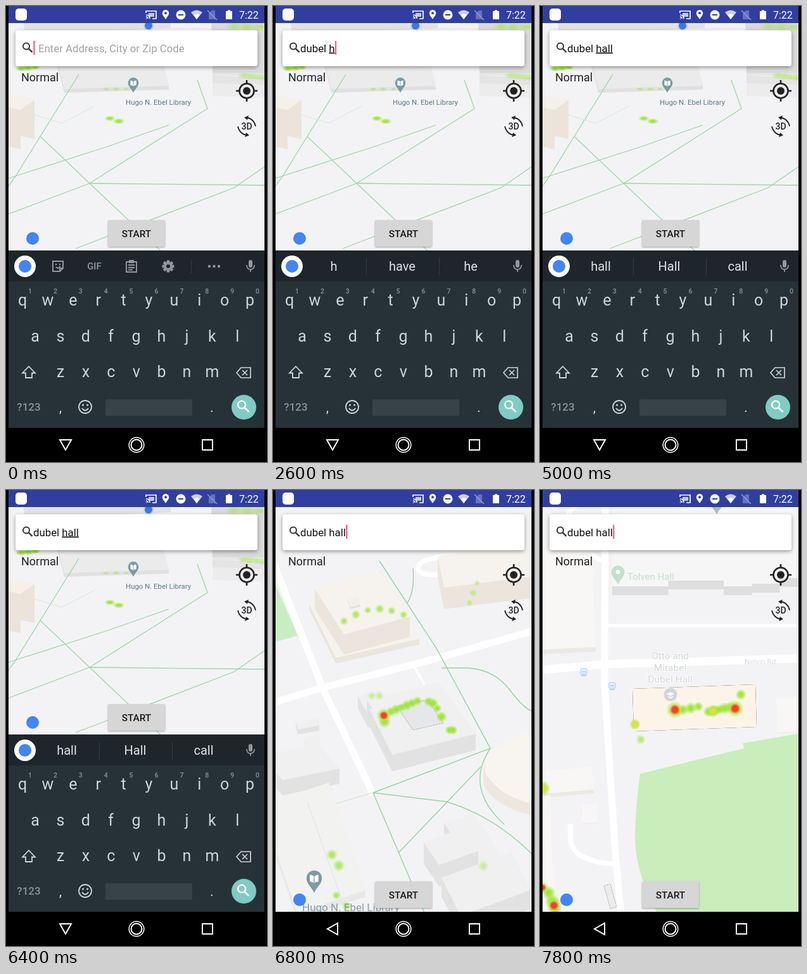
Animation of 412 by 720 pixels, one loop 8 s. Source, as an HTML page:

```html
<!DOCTYPE html>
<html lang="en">
<head>
<meta charset="utf-8">
<title>Map search</title>
<style>
html, body { margin: 0; height: 100%; overflow: hidden; background: #000; }
svg { display: block; width: 100%; height: 100%; font-family: Roboto, sans-serif; }
text { white-space: pre; }
.mid { text-anchor: middle; }
.bold { font-weight: 500; }
.u { text-decoration: underline; }
</style>
</head>
<body>
<svg id="stage" viewBox="0 0 412 720"></svg>
<script>
const LOOP = 8000, STEP = 200;
const KEY = 350, PRESS = 100;              // one key every 350 ms, its bubble just before
const IDLE = 5000, HIDE = 6600, FLY = 6800, ARRIVE = 7000;
const QUERY = 'dubel hall', LIBRARY = 'Hugo N. Ebel Library';
const suggestions = ['d do did', 'du due dude', 'dub dubbed double', 'dube dub due', 'dubel duel fuel',
  'hall is and', 'h have he', 'ha have had', 'hal half hall', 'hall Hall call'];

// drawing helpers
const shape = (d, fill, more = '') => `<path d="${d}" fill="${fill}" ${more}/>`;
const line = (d, color, w) => shape(d, 'none', `stroke="${color}" stroke-width="${w}"`);
const disc = (x, y, r, fill, more = '') => `<circle cx="${x}" cy="${y}" r="${r}" fill="${fill}" ${more}/>`;
const ring = (x, y, r, color, w) => disc(x, y, r, 'none', `stroke="${color}" stroke-width="${w}"`);
const box = (x, y, w, h, fill, more = '') =>
  `<rect x="${x}" y="${y}" width="${w}" height="${h}" fill="${fill}" ${more}/>`;
const text = (x, y, size, fill, str, cls = '', more = '') =>
  `<text x="${x}" y="${y}" font-size="${size}" fill="${fill}" class="${cls}" ${more}>${str}</text>`;
const mid = (x, y, size, fill, str, more) => text(x, y, size, fill, str, 'mid', more);
const bold = (x, y, size, fill, str) => text(x, y, size, fill, str, 'mid bold');
const group = (id, inner) => `<g id="${id}">${inner}</g>`;
const at = (x, y, inner, s = 1) => `<g transform="translate(${x} ${y}) scale(${s})">${inner}</g>`;
const times = (n, fn) => Array.from({ length: n }, (_, i) => fn(i)).join('');

const STONE = ['#f0f0f0', '#e2e2e2'], SAND = ['#f6f3ef', '#ebe5de'], PALE = ['#f8f7f6', '#ece8e3'];

// a building: roof from a corner and two edges, walls dropped by h
function block(x, y, ux, uy, vx, vy, h, [roof, wall]) {
  const quad = `l${ux} ${uy}l${vx} ${vy}l${-ux} ${-uy}z`;
  const side = (px, py, ex, ey) => `M${px} ${py}l${ex} ${ey}v${h}l${-ex} ${-ey}z`;
  return shape(`M${x} ${y + h}${quad}` + side(x, y, vx, vy) + side(x + vx, y + vy, ux, uy) +
    side(x + ux, y + uy, vx, vy), wall) + shape(`M${x} ${y}${quad}`, roof);
}

// heat: level 0 green, 1 yellow core, 2 red core
const glow = (x, y, r, level = 0) => ['hg', 'hy', 'hr'].slice(0, level + 1)
  .map((id, i) => disc(x, y, r * (1 - .2 * i), `url(#${id})`)).join('');
const trail = (x1, y1, x2, y2, n, r, bend = 0) => times(n, i => {
  const p = n > 1 ? i / (n - 1) : 0;
  return glow(x1 + (x2 - x1) * p, y1 + (y2 - y1) * p - bend * Math.sin(p * Math.PI), r + Math.sin(i * 2.4));
});
const faint = (inner, o) => `<g opacity="${o}">${inner}</g>`;

const gradient = (id, color, solid) => `<radialGradient id="${id}"><stop offset="${solid}" stop-color="${color}"/>
  <stop offset="1" stop-color="${color}" stop-opacity="0"/></radialGradient>`;
const pin = (color, glyph = '') => shape('M0 14C-3 7-9 4-9-3A9 9 0 0 1 9-3C9 4 3 7 0 14Z', color) + glyph;
const bookPin = pin('#7c9aa3', shape('M-5-7Q-2-7 0-5Q2-7 5-7V1Q2 1 0 3Q-2 1-5 1Z', '#fff') + line('M0-5V3', '#7c9aa3', 1));
const lens = (x, y, color, s = 1) => at(x, y, ring(-2, -2, 5, color, 2) + line('M2 2L7.5 7.5', color, 2.4), s);

function startView() {
  const green = '#9ed4a6';
  return box(0, -150, 412, 850, '#f3f3f5') +
    block(20, -60, 230, -10, 10, 80, 25, STONE) +
    block(70, 45, 165, -5, 22, 86, 6, ['#ebebeb', '#e0e0e0']) +
    block(324, 20, 100, 0, 2, 86, 4, ['#dadada', '#e6e6e6']) +
    block(326, 110, 90, 3, 0, 12, 20, ['#e4e4e4', '#ececec']) +
    block(-20, 134, 65, 14, -22, 16, 62, ['#f5f0ea', '#ece3da']) +
    line('M0 290L15 269L54 206L115 108M54 206L132 280L420 553M4 272L160 222L257 188', green, 1.3) +
    line('M0 330L132 280L318 162L302 117M132 280L412 283M110 383L360 287L412 251', green, 1.3) +
    line('M45 172L88 185L140 158', '#d3e8d5', 1) +
    `<g transform="scale(1 .5)">` + trail(164, 355, 178, 364, 2, 9) + trail(24, 198, 46, 194, 3, 9) +
    faint(trail(158, 262, 190, 262, 3, 6) + trail(376, 220, 406, 226, 4, 11) + trail(360, 64, 400, 66, 3, 14), .5) + '</g>' +
    disc(225, 31, 8, '#9fbdf0', 'opacity=".5"') + disc(225, 31, 6, '#3c78dc') +
    at(201, 124, bookPin, .92) + text(189, 155.5, 11.4, '#5d7983', LIBRARY);
}

function flyView() {
  const green = '#98d1a1';
  return box(0, 0, 412, 700, '#f3f3f5') + shape('M0 140L39 230L0 241Z', '#c9edc3') +
    line('M0 336L78 312L240 271L412 222M2 118L78 312L158 480', '#fff', 11) +
    line('M290 104Q232 106 229 122T275 132', '#fff', 8) + line('M222 277L239 307', '#fff', 4) +
    line('M168 112L258 250L343 408L158 478L273 492Q350 515 412 578M266 281H308Q350 284 374 316T412 350', green, 1.4) +
    line('M343 408Q322 440 328 470T365 528M328 437L198 573M158 478L240 670M221 124Q224 160 212 178', green, 1.4) +
    line('M0 524L158 478', '#cae4cd', 1.2) +
    block(57, 180, 132, -30, 42, 85, 9, SAND) + block(66, 156, 104, -28, 46, 72, 32, SAND) +
    block(118, 172, 16, -4, 4, 13, 3, ['#f3f0ec', '#e6e0d9']) +
    block(260, 104, 160, -20, 10, 50, 34, SAND) +
    block(134, 325, 34, -10, 16, 30, 20, STONE) +
    block(148, 332, 112, -28, 60, 81, 26, STONE) + block(152, 346, 38, -9, 36, 72, 26, STONE) +
    block(196, 342, 48, -11, 25, 37, 0, ['#e6e7e9', '']) +
    block(36, 366, 34, -6, 3, 12, 8, STONE) + block(50, 390, 22, -5, 2, 24, 8, STONE) +
    block(-20, 420, 90, -18, 35, 38, 24, STONE) +
    block(-20, 498, 108, -36, 58, 170, 10, ['#f2f2f1', '#e8e8e7']) + line('M54 492L108 645', '#e0e0e0', 1) +
    block(270, 526, 46, -14, 66, 100, 34, STONE) + block(238, 556, 62, -22, 24, 36, 34, STONE) +
    block(266, 612, 110, -40, 30, 60, 30, STONE) +
    shape('M412 385L343 412Q327 436 334 470Q360 505 412 514Z', '#eee7df') +
    shape('M412 380L345 410Q328 430 338 452Q362 485 412 496Z', '#f8f5f1') +
    faint(trail(112, 207, 206, 197, 6, 7, 14) + trail(93, 576, 104, 593, 2, 9) + trail(100, 640, 116, 657, 2, 7), .8) +
    faint(trail(310, 178, 322, 147, 3, 6) + trail(156, 325, 168, 325, 2, 7) + glow(332, 594, 9), .45) +
    trail(186, 350, 228, 333, 6, 8) + trail(246, 334, 266, 358, 4, 8, 6) + trail(278, 379, 284, 379, 2, 7) +
    glow(176, 366, 10) + glow(175, 356, 12, 2) +
    at(65, 617, bookPin, 1.35) + text(46, 665, 17, '#8a9ba2', LIBRARY);
}

// the camera turns about the hall: k = 0 settled, k = 1 sixteen degrees away
const camera = k => `translate(${213 + 91 * k} ${347 + 73 * k}) rotate(${-16 * k}) translate(-213 -347)`;

function hallView() {
  const grey = '#d2d5d7', cross = 'M-600 322L4 284L103 275L700 257';
  const bus = (x, y) => box(x - 5, y - 5, 10, 9, '#e3f0fb', 'stroke="#9fcbee" rx="1.5"') +
    line(`M${x - 3} ${y}h6m-7 6h8`, '#9fcbee', 1.5);
  const hall = [['#eaeaea', 14], ['#f6f6f6', 0]].map(([fill, drop]) => times(10, i =>
    box(114 + i * 44, 20, 44.5, (i % 4 < 2 ? 132 : 123) + drop - (i > 4 ? 4 : 0), drop ? '#dedede' : fill))).join('');
  const land = box(-800, -800, 1800, 2000, '#f3f3f5') +
    line(cross, '#fff', 13) + line('M107 214H700', '#fff', 5) +
    line('M105 -300L102 230V310L118 560L132 720L160 900', '#fff', 11) +
    line('M103 9Q35 20 45 55T98 112M48 527V548Q48 588 125 591', '#fff', 8) +
    block(-260, 110, 342, -17, 6, 155, 7, PALE) + hall +
    block(146, 314, 194, -7, 2, 67, 0, ['#fdf4e9', '']) +
    block(373, 329, 90, -3, 1, 54, 1, PALE) +
    shape('M158 448L322 408L320 400L412 384H700V900H330L185 668Q148 600 150 540Q152 490 158 448Z', '#c9edbb') +
    block(-64, 326, 40, 0, 5, 160, 6, PALE) + block(-24, 446, 106, -9, 3, 36, 6, PALE) +
    block(-64, 486, 80, -4, 8, 230, 4, PALE) +
    block(66, 497, 24, -1, 1, 29, 1, PALE) + block(101, 625, 10, -3, 10, 36, 0, ['#ececec', '']) +
    trail(226, 347, 250, 342, 3, 9) + trail(266, 350, 300, 343, 5, 9) + glow(273, 349, 10, 1) +
    glow(213, 347, 14, 2) + glow(308, 345, 14, 2) + glow(317, 323, 9) + glow(150, 370, 9, 1) + faint(glow(159, 394, 8), .7) +
    glow(4, 628, 10, 2) + trail(14, 636, 24, 662, 3, 11) + glow(22, 656, 13, 2) +
    `<g transform="translate(213 347) rotate(16) translate(-304 -420)">` +
    trail(60, 515, 68, 530, 2, 9) + faint(trail(38, 537, 79, 554, 3, 6), .7) + trail(60, 592, 122, 598, 6, 8) +
    glow(137, 597, 13, 1) + trail(64, 612, 74, 632, 3, 10) + glow(82, 633, 13, 2) + trail(97, 608, 103, 658, 4, 7) +
    trail(24, 268, 23, 284, 3, 8) + trail(8, 225, 8, 225, 1, 9) + '</g>';
  const name = ['Otto and', 'Mirabel', 'Dubel Hall'].map((s, i) =>
    mid(205.5, 267 + i * 18.7, 15.5, grey, s, 'stroke="#fff" stroke-width="2" paint-order="stroke"')).join('');
  return group('land', land) + group('labels', name + disc(206, 323, 10.5, grey) +
    at(206, 323, shape('M-6-1L0-4L6-1L0 2ZM-4 2L0 4L4 2V4L0 6L-4 4Z', '#fff')) +
    at(123, 133, pin('#c3e0ca', disc(0, -3, 3, '#fff')), 1.15) + text(138, 142, 15, '#c3dfca', 'Tolven Hall') +
    text(323, 274.5, 11.8, '#dadcdf', 'Nelvin Rd') + bus(69, 287) + bus(114, 309) + at(279, 23, pin('#a9bac8'), 1.1));
}

function statusBar() {
  const w = '#fff', bar = '#303f9f';
  return box(4, 0, 404, 27, bar) + box(15, 4, 18, 19, w, 'rx="5"') +
    at(229, 14, line('M-8-3V-6H8V6H2M-8 6H-7M-8 3Q-5 3-5 6M-8 0Q-2 0-2 6', w, 1.7) + box(-4, -3, 9, 6, w, 'opacity=".7"')) +
    at(252, 13, pin(w, disc(0, -3, 3.4, bar)), .58) + disc(276, 14, 7.5, w) + box(272, 13, 8, 2, bar) +
    shape('M292 10Q301 3 310 10L301 21Z', w, 'opacity=".75"') + shape('M296 14Q301 11 306 14L301 21Z', w) +
    shape('M320 12L325 7H330V21H320Z', '#6673bb') + line('M318 7L333 22', '#8f99d0', 1.6) +
    shape('M347 8H350V6.5H354V8H357V21H347Z', w) + text(368, 20, 16, w, '7:22');
}

function controls() {
  const ink = '#222';
  const halfTurn = line('M-2-14Q11-13 14 0', ink, 1.8) + shape('M-4-14L3-17L1-10Z', ink);
  return box(15, 38.5, 382, 56.5, '#fff', 'rx="4" filter="url(#shadow)"') + lens(34, 65.5, '#333') +
    text(51, 72.5, 16.8, '#a2a2a2', 'Enter Address, City or Zip Code', '', 'id="hint"') +
    text(43, 72.5, 16.8, '#111', '<tspan id="done"></tspan><tspan id="word" class="u"></tspan>', '', 'id="field"') +
    box(0, 55, 2.4, 22, '#ec6a86', 'id="caret"') + text(24, 119, 18, ink, 'Normal') +
    at(380, 134, ring(0, 0, 11.5, ink, 2.6) + disc(0, 0, 6, ink) + line('M0-17V-11M0 11V17M-17 0H-11M11 0H17', ink, 2.6)) +
    bold(380, 195, 14, ink, '3D') + at(380, 190, halfTurn + `<g transform="rotate(180)">${halfTurn}</g>`) +
    group('lower', disc(42, 367, 10, '#4285f4') +
      box(161, 338, 90, 42, '#d6d6d6', 'rx="2" filter="url(#lift)"') + bold(206, 365, 15.3, '#181818', 'START'));
}

// key centres by letter
const keyAt = {};
['qwertyuiop', 'asdfghjkl', 'zxcvbnm'].forEach((keys, row) =>
  [...keys].forEach((c, i) => keyAt[c] = [26 + row * 20 + (row > 1 ? 20 : 0) + i * 39.9, 473 + row * 56.5]));

function keyboard() {
  const ink = '#ced5d8', dim = '#87949b', tool = '#8f989e', bar = '#1f262b';
  const letters = Object.entries(keyAt).map(([c, [x, y]]) => mid(x, y, 25, ink, c)).join('');
  const digits = times(10, i => bold(38 + i * 39.9, 454, 10.5, dim, (i + 1) % 10));
  const gear = disc(0, 0, 7, tool) + times(4, i =>
    box(-2.3, -9.5, 4.6, 19, tool, `transform="rotate(${i * 45})"`)) + disc(0, 0, 3, bar);
  const tools = at(82, 411, line('M-8-8H8V3L3 8H-8ZM3 8V3H8M-3 1Q0 5 4 0', tool, 2) + disc(-3, -3, 1.3, tool) + disc(3, -3, 1.3, tool)) +
    bold(139.5, 416, 15, tool, 'GIF') +
    at(198, 411, line('M-8-7H8V9H-8ZM-5-2H5M-5 2H5M-5 5.5H2', tool, 1.9) + box(-4, -10, 8, 5, tool)) +
    at(256, 411, gear) + line('M292.5 401V422', '#343d43', 1) + times(3, i => disc(321 + i * 7.5, 411, 2.2, tool));
  const words = times(3, i => mid(96 + i * 108, 418, 20, '#dfe3e5', '')) + line('M147.5 398V425M262.5 398V425', '#343d43', 1);
  return box(4, 386, 404, 280, '#263238') + box(4, 386, 404, 49, bar) +
    disc(30, 411, 17, '#fff') + disc(30, 411, 10, '#4285f4') + group('tools', tools) + group('words', words) +
    at(386, 410, box(-3, -9, 6, 12, tool, 'rx="3"') + line('M-6-1Q-6 6 0 6T6-1M0 6V10', tool, 1.8)) + letters + digits +
    line('M36 569L46 579.5H41V587H31V579.5H26Z', ink, 1.8) +
    line('M371 571H386V587H371L364 579ZM373 575L381 583M381 575L373 583', ink, 1.7) +
    bold(36, 639, 17, dim, '?123') + mid(86, 641, 22, ink, ',') + mid(325, 641, 22, ink, '.') +
    at(125, 633, ring(0, 0, 10, ink, 1.8) + disc(-3.5, -3, 1.5, ink) + disc(3.5, -3, 1.5, ink) + line('M-5 2Q0 9 5 2', ink, 1.8)) +
    box(157, 621, 137, 26, '#374349', 'rx="2"') + disc(375.5, 633.5, 19.5, '#80cbc4') + lens(374.5, 632, '#fff', 1.2) +
    group('bubble', box(-23, -80, 46, 52, '#3b4a52', 'rx="4"') + mid(0, -45, 29, '#eceff1', '', 'id="big"'));
}

function navBar() {
  return box(0, 666, 412, 54, '#000') + box(0, 0, 4, 720, '#000') + box(408, 0, 4, 720, '#000') +
    `<path id="back" d="M-9-8H9L0 8Z" fill="none" stroke="#fff" stroke-width="2"/>` +
    ring(206, 693, 11.8, '#fff', 1.5) + ring(206, 693, 8.5, '#fff', 2) +
    box(310, 685, 16, 16, 'none', 'stroke="#fff" stroke-width="2"');
}

const shadow = (id, dy, blur, alpha) => `<filter id="${id}" x="-10%" y="-30%" width="120%" height="170%">
  <feDropShadow dx="0" dy="${dy}" stdDeviation="${blur}" flood-opacity="${alpha}"/></filter>`;
document.getElementById('stage').innerHTML = `<defs>
  ${gradient('hg', '#9fe63c', .3)}${gradient('hy', '#e6e03a', .3)}${gradient('hr', '#ee4037', .5)}
  ${shadow('shadow', 2, 3, .4)}${shadow('lift', 1, 1.2, .35)}</defs>` +
  group('start', startView()) + group('fly', flyView()) + group('hall', hallView()) +
  statusBar() + controls() + group('keys', keyboard()) + navBar();

const el = id => document.getElementById(id);
const show = (id, on) => el(id).setAttribute('display', on ? 'inline' : 'none');
const move = (id, value) => el(id).setAttribute('transform', value);
const slots = el('words').querySelectorAll('text');

function draw(t) {
  const open = t < HIDE;
  const count = Math.min(QUERY.length, Math.floor(t / KEY));
  const value = QUERY.slice(0, count);
  const cut = open ? value.lastIndexOf(' ') + 1 : count;
  el('done').textContent = value.slice(0, cut);
  el('word').textContent = value.slice(cut);
  show('hint', !count);

  const since = open ? Math.min(t, IDLE) - count * KEY : t - HIDE;
  show('caret', since % 1000 < 500);
  el('caret').setAttribute('x', 43.2 + (count ? el('field').getComputedTextLength() : 0));

  show('keys', open);
  show('tools', !count);
  show('words', count);
  if (count) suggestions[count - 1].split(' ').forEach((w, i) => slots[i].textContent = w);
  const next = QUERY[count], pressed = next in keyAt && t % KEY >= KEY - PRESS;
  show('bubble', pressed);
  if (pressed) {
    move('bubble', `translate(${keyAt[next]})`);
    el('big').textContent = next;
  }

  move('lower', `translate(0 ${open ? 0 : 280})`);
  move('back', `translate(94 693) rotate(${open ? 0 : 90})`);
  move('start', `translate(0 ${open ? 0 : 140})`);
  show('start', t < FLY);
  show('fly', t >= FLY && t < ARRIVE);
  show('hall', t >= ARRIVE);
  const p = Math.max(0, (t - ARRIVE) / (LOOP - STEP - ARRIVE));
  move('land', camera(2 * (1 - p) ** 2.4));
  el('labels').setAttribute('opacity', Math.max(0, 2 * p - 1));
}

const t0 = performance.now();
function tick() {
  const t = (performance.now() - t0) % LOOP;
  draw(Math.floor(t / STEP) * STEP);
  requestAnimationFrame(tick);
}
tick();
</script>
</body>
</html>
```
